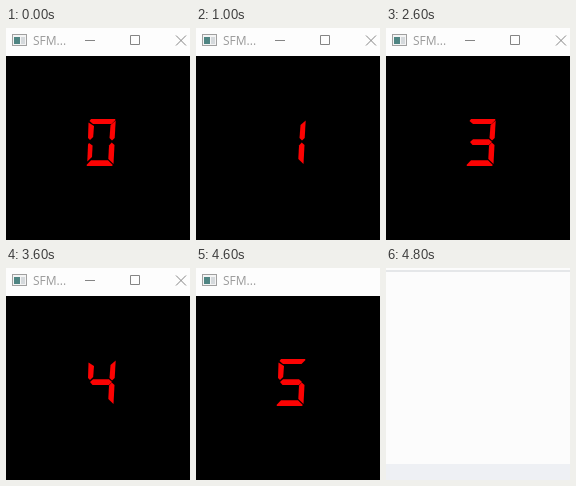
An HTML page that plays this animation: 184 px wide and 212 px high, repeating every 4.9 s.

```html
<!DOCTYPE html>
<html lang="en">
<head>
<meta charset="utf-8">
<title>Counter</title>
<style>
  html, body { margin: 0; width: 100%; height: 100%; overflow: hidden; background: #fcfcfc; }
  svg { display: block; width: 184px; height: 212px; }
  text { font: 12px "Open Sans", "Noto Sans", sans-serif; }
</style>
</head>
<body>
<svg viewBox="0 0 184 212">
  <defs>
    <g id="icon">
      <rect x="6.5" y="6.5" width="14" height="11" fill="#f4f4f4" stroke="#a0a0a0"/>
      <rect x="8" y="9" width="6" height="7" fill="#4f8583"/>
      <rect x="15" y="9" width="4" height="7" fill="#d5d9dc"/>
    </g>
  </defs>

  <g id="desk">
    <rect width="184" height="212" fill="#fcfcfc"/>
    <rect y="2" width="184" height="2" fill="#e5e7e9"/>
    <rect y="196" width="184" height="16" fill="#eef0f4"/>
  </g>

  <g id="open">
    <rect width="184" height="212"/>
    <rect width="184" height="28" fill="#fdfdfd"/>
    <use href="#icon"/>
    <text x="27" y="17" fill="#999">SFM...</text>
    <g id="buttons" fill="none" stroke="#858585">
      <path d="M79 12.5h10M124.5 7.5h9v9h-9z"/>
      <path d="M170 7.5l10 10M180 7.5l-10 10"/>
    </g>
  </g>

  <g id="fading">
    <rect width="184" height="212" fill="#828282"/>
    <rect width="184" height="30" fill="#a9a9a9"/>
    <rect width="184" height="2" fill="#b2b2b2"/>
    <rect y="2" width="184" height="1" fill="#a0a0a0"/>
    <rect y="196" width="184" height="16" fill="#7c7c7c"/>
    <rect width="1" height="212" fill="#979797"/>
    <use href="#icon" x="2" y="3" opacity=".3"/>
    <text x="29" y="20" fill="#979797">SFM...</text>
  </g>

  <g id="digit"></g>
</svg>
<script>
const LOOP = 4900;

const SEGMENTS = {
  a: "85,91 109,91 109.5,92 105.5,96 87,96 83.5,93",
  b: "109.7,92.5 108.7,110 106,112.5 103.5,110 104.5,97",
  c: "105.7,114.5 108.5,117 107.5,136 102.3,131 103,117.5",
  d: "80.5,137 85,132.3 102,132.3 106.8,137 106,138 81,138",
  e: "83,115 86.6,117.5 86,129 81.3,133.5 82,116.5",
  f: "82.5,94.5 88,98 87.2,109 84,112 82,110",
  g: "84,114 87,111.2 103,111.2 106,114 103,117 86.5,117"
};

// start time, lit segments, view
const STEPS = [
  [0, "abcdef", "open"],
  [600, "bc", "open"],
  [1600, "abged", "open"],
  [2600, "abgcd", "open"],
  [3600, "fgbc", "open"],
  [4600, "afgcd", "closing"],
  [4700, "afgcd", "fading"],
  [4800, "", "desk"]
];

const el = id => document.getElementById(id);
const digit = el("digit");
const bars = {};
for (const [name, points] of Object.entries(SEGMENTS)) {
  const bar = document.createElementNS("http://www.w3.org/2000/svg", "polygon");
  bar.setAttribute("points", points);
  bars[name] = digit.appendChild(bar);
}

const show = (node, on) => { node.style.display = on ? "" : "none"; };

function draw(time) {
  const [, lit, view] = STEPS.findLast(step => step[0] <= time);
  show(el("open"), view === "open" || view === "closing");
  show(el("buttons"), view === "open");
  show(el("fading"), view === "fading");
  digit.setAttribute("fill", view === "fading" ? "#aa6d72" : "#fc0303");
  for (const name in bars) show(bars[name], lit.includes(name));
}

const start = performance.now();
function tick(now) {
  draw(Math.max(0, now - start) % LOOP);
  requestAnimationFrame(tick);
}
draw(0);
requestAnimationFrame(tick);
</script>
</body>
</html>
```
